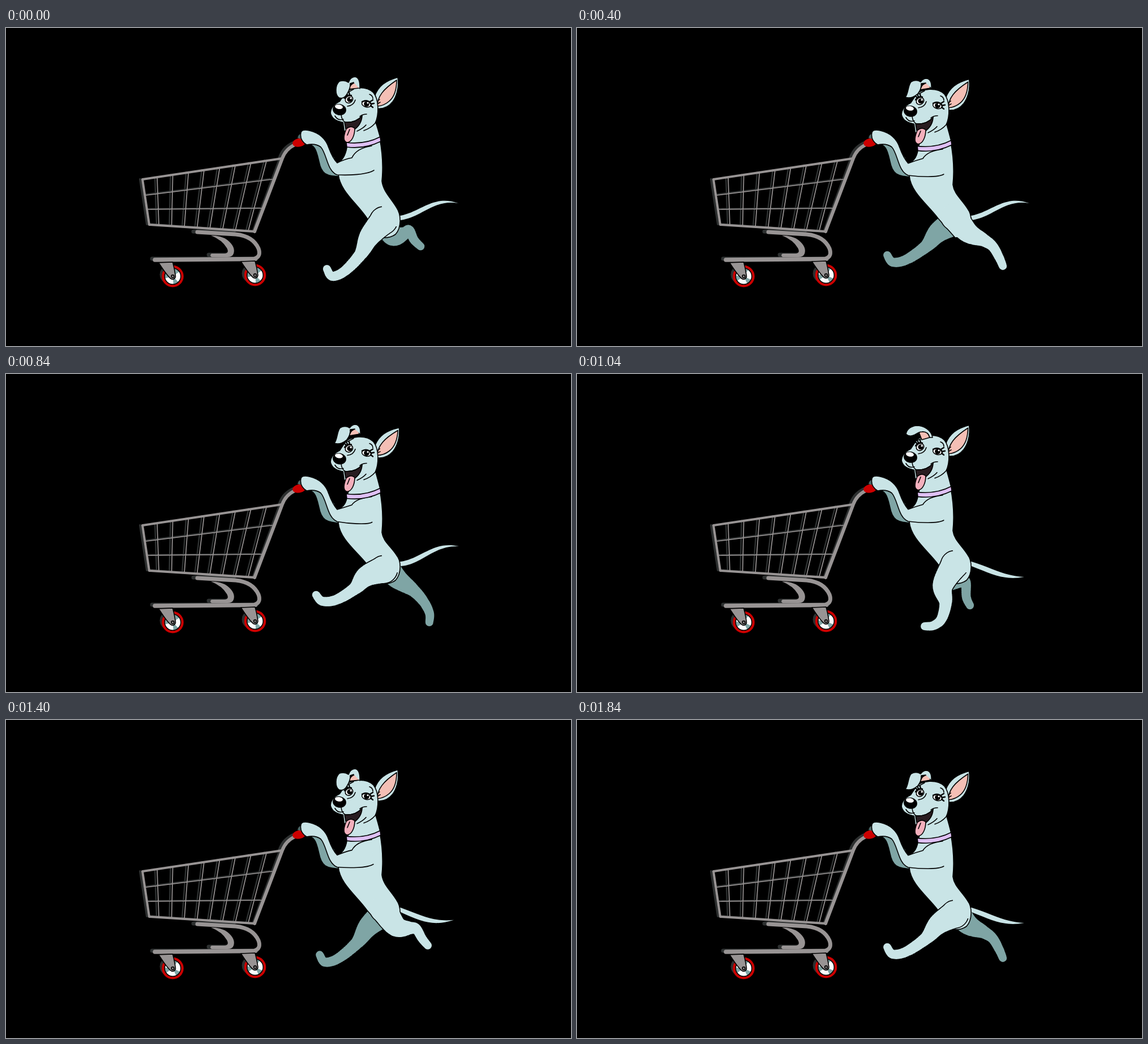
Animation of 998 by 561 pixels, one loop 1880 ms. Source, as an HTML page:

```html
<!DOCTYPE html>
<html lang="en">
<head>
<meta charset="utf-8">
<title>Dog with a shopping cart</title>
<style>
html, body { margin: 0; width: 100%; height: 100%; overflow: hidden; background: #000; }
svg { display: block; width: 100%; height: 100%; }
path, circle, ellipse { stroke-linejoin: round; stroke-linecap: round; }
.skin { fill: #c9e4e6; }
.far { fill: #7fa5a5; }
.pink { fill: #f4bfb5; }
.ink { stroke: #000; stroke-width: 1.6; }
.line { fill: none; stroke: #000; stroke-width: 1.6; }
.rail { fill: none; stroke: #989494; }
.shade { fill: none; stroke: #2d3030; }
</style>
</head>
<body>
<svg viewBox="0 0 998 561">
  <clipPath id="thighEdge"><path d="M500 280H664V350H800V500H500Z"/></clipPath>
  <rect width="998" height="561"/>

  <g id="cart">
    <g class="shade" transform="translate(-4 -1)">
      <path stroke-width="4" d="M241 268L253 347L440 360L488 230"/>
      <path stroke-width="7" d="M488 230Q495 210 515 203M335 360H406M362 401H395M262 408H446"/>
      <path id="wireShade" stroke-width="2.5"/>
      <circle cx="292" cy="436" r="16" fill="#2d3030"/>
      <circle cx="437" cy="434" r="16" fill="#2d3030"/>
    </g>
    <path id="wires" class="rail" stroke-width="1.7"/>
    <path class="rail" stroke-width="4" d="M488 230L241 267L253 347L440 359"/>
    <path class="rail" stroke-width="6" d="M439 359L488 230Q495 211 515 204"/>
    <path fill="#989494" d="M362 366Q380 366 391 374Q406 386 402 398Q400 404 391 404H363Q359 401 363 398H386Q395 397 390 388Q382 374 362 366Z"/>
    <path class="rail" stroke-width="7" d="M338 360L406 364Q436 367 446 389Q451 403 439 407"/>
    <path class="rail" stroke-width="7.5" d="M263 409L440 407.5"/>
    <g id="wheels"></g>
    <ellipse cx="518" cy="202" rx="12" ry="7.5" transform="rotate(-12 518 202)" fill="#cc0000"/>
    <path d="M515 194Q517 185 523 188L522 196Z" fill="#4d6464"/>
  </g>

  <path id="tail" class="skin"/>
  <path id="farLeg" class="far"/>
  <path id="farArm" class="far ink"/>
  <path id="legUnder" stroke="#000" stroke-width="3"/>
  <path id="body" class="skin ink"/>
  <path id="legOver" stroke="#000" stroke-width="3" clip-path="url(#thighEdge)"/>
  <path id="leg" class="skin"/>
  <path id="armFill" class="skin"/>
  <path id="armLine" class="line"/>

  <path id="neck" class="skin"/>
  <path id="collar" class="ink" fill="#dfc0f5" d="M601 202Q634 206 661 192L662 200Q634 214 602 210Z"/>
  <g id="head">
    <g id="rightEar">
      <path class="skin ink" d="M651 121C657 103 670 93 692 87C695 106 689 122 683 130Q672 144 655 142Z"/>
      <path class="pink ink" d="M656 138C656 121 666 108 690 92C690 112 684 123 677 129Q668 137 656 138Z"/>
      <path class="line" d="M655 130L660 126M656 134L661 131"/>
    </g>
    <path class="skin" d="M600 115C607 104 636 101 649 114C659 126 659 154 652 168Q640 182 618 185L598 181L596 166C588 164 577 162 574 150Q574 138 590 130Z"/>
    <path class="line" d="M600 115C607 104 636 101 649 114C659 126 659 154 652 168Q644 177 632 181"/>
    <path d="M598 166Q617 168 629 155Q628 171 614 180L600 178Z" fill="#281c20" class="ink"/>
    <path d="M601 178Q609 171 616 177C616 189 611 202 602 202C594 199 597 188 601 178Z" fill="#f3afbc" class="ink"/>
    <path class="line" d="M607 179L603 189M592 153Q593 163 599 166Q617 168 629 155M625 156Q630 152 637 152M636 171Q631 177 620 182M581 155Q586 164 596 161M617 127Q614 137 603 138M642 117Q648 119 648 125M603 114L614 108"/>
    <ellipse cx="589" cy="144" rx="12" ry="10" transform="rotate(12 589 144)"/>
    <ellipse cx="588" cy="139" rx="7" ry="4" transform="rotate(8 588 139)" fill="#fff"/>
    <g class="ink">
      <ellipse cx="606" cy="126" rx="7" ry="6" transform="rotate(-35 606 126)" fill="#fff"/>
      <ellipse cx="637" cy="134" rx="8.5" ry="5.5" transform="rotate(12 637 134)" fill="#fff"/>
      <path d="M598 124Q602 117 610 119M600 119L596 116M603 118L600 113M607 118L606 114M629 130Q640 125 645 135M643 130L648 127M645 134L650 133M644 137L648 140" fill="none" stroke-width="2.4"/>
    </g>
    <circle cx="607" cy="126" r="4.6"/><circle cx="637" cy="134" r="4.8"/>
    <circle cx="609" cy="124" r="1.6" fill="#fff"/><circle cx="639" cy="132" r="1.6" fill="#fff"/>
  </g>
  <path id="earInner" class="pink ink"/>
  <path id="ear" class="skin ink"/>
</svg>

<script>
const STEP = 40, FRAMES = 47, STRIDE = 24, BOUNCE = 12, WAG = 10, TURN = 2 * Math.PI;
const $ = id => document.getElementById(id);
const draw = (id, d) => $(id).setAttribute("d", d);
const move = (id, value) => $(id).setAttribute("transform", value);
const mix = (a, b, k) => a + (b - a) * k;
const clamp = v => Math.min(1, Math.max(0, v));

const spline = (a, b, c, d, k) =>
  b + k / 2 * (c - a + k * (2 * a - 5 * b + 4 * c - d + k * (3 * (b - c) + d - a)));

// Returns a smooth closed path through evenly timed "x,y" points; t runs from 0 to 1.
function trace(text) {
  const points = text.split(" ").map(p => p.split(",").map(Number));
  const n = points.length;
  return t => {
    const i = Math.floor(t * n), k = t * n - i;
    return [0, 1].map(axis => spline(...[-1, 0, 1, 2].map(o => points[(i + o + n) % n][axis]), k));
  };
}

// One stride of the leg, starting as the foot lands in front.
const kneePath = trace("642,368 650,374 672,374 690,360 683,366 636,362 622,357 636,357");
const anklePath = trace("598,429 666,431 698,430 738,402 712,357 672,374 627,383 584,398");
const heelPath = trace("576,438 656,444 695,443 748,422 721,374 668,402 600,381 559,401");

function joints(t) {
  const knee = kneePath(t), ankle = anklePath(t), heel = heelPath(t);
  const hip = [667, 333 + 0.85 * Math.max(0, 650 - knee[0])];
  const shin = [(knee[0] + ankle[0]) / 2 + 6, (knee[1] + ankle[1]) / 2 + 1];
  // The toe swings freely in the air and lies flat on the ground.
  const swing = 68 + 95 * Math.cos(TURN * t) - 18 * Math.cos(2 * TURN * t);
  const angle = mix(swing, 85, clamp((heel[1] - 438) / 4)) * Math.PI / 180;
  const toe = [heel[0] - 16 * Math.sin(angle), heel[1] + 16 * Math.cos(angle)];
  return [hip, knee, shin, ankle, heel, toe];
}

const disc = (x, y, r) => {
  const f = v => v.toFixed(2);
  return `M${f(x - r)} ${f(y)}a${f(r)} ${f(r)} 0 1 1 ${f(2 * r)} 0a${f(r)} ${f(r)} 0 1 1 ${f(-2 * r)} 0`;
};

// A limb is a dense chain of discs along a smooth centre line.
function limb(phase) {
  const girth = [24, 18, 11, 9, 8, 7];
  const bones = joints(phase % STRIDE / STRIDE), last = bones.length - 1;
  const joint = i => bones[Math.min(last, Math.max(0, i))];
  let d = "";
  for (let i = 0; i < last; i++) {
    for (let s = 0; s <= 10; s++) {
      const k = s / 10;
      const [x, y] = [0, 1].map(n => spline(joint(i - 1)[n], joint(i)[n], joint(i + 1)[n], joint(i + 2)[n], k));
      d += disc(x, y, mix(girth[i], girth[i + 1], k));
    }
  }
  return d;
}

const ears = {
  folded: ["M625 107Q626 87 616 86Q608 87 605 96Q598 91 589 94C581 101 581 118 588 123Q597 126 602 117Q609 106 608 98L614 96",
    "M605 108Q609 97 619 96Q624 99 624 106Z"],
  hanging: ["M626 106Q627 91 618 89Q611 89 607 95Q599 90 590 95C584 103 586 114 580 122Q590 126 602 116Q609 107 608 98L616 97",
    "M606 109Q610 97 619 97Q624 100 624 106Z"],
  arched: ["M628 112C626 99 613 91 599 91Q583 94 581 106Q588 112 597 107Q604 102 609 102Q620 101 623 112Z",
    "M604 103Q614 99 620 104L623 112L609 116Z"],
  raised: ["M632 115Q631 106 624 105Q618 109 611 107C604 102 599 99 589 100Q582 104 585 112Q591 122 603 119Q612 115 622 117Z", ""]
};
const earAt = beat => beat < 1 || beat > 10 ? ears.folded : beat < 5 ? ears.arched : beat < 8 ? ears.raised : ears.hanging;

function buildCart() {
  let d = "M247 295L470 267M250 320L452 318";
  for (let i = 0; i < 8; i++) {
    const top = 267 + 27.6 * i, low = 270 + 22.5 * i;
    d += `M${top} ${268 - (top - 241) * 0.154}L${low} ${347 + (low - 253) * 0.07}`;
  }
  draw("wires", d);
  draw("wireShade", d);
  const wedge = "M0 0L13.2 -4.8A14 14 0 0 1 13.2 4.8Z";
  const wheel = (x, y) => `<g transform="translate(${x} ${y})">
    <circle r="17" fill="#fff" stroke="#cc0000" stroke-width="4.5"/>
    <g class="spokes">${[0, 120, 240].map(a => `<path class="far" transform="rotate(${a})" d="${wedge}"/>`).join("")}</g>
    <circle r="14.3" class="line"/>
    <path class="ink" fill="#989494" d="M-25 -24L0 -25Q3 -14 5 0Q4 6 -2 5Q-8 2 -25 -24Z"/>
    <circle r="2.4" fill="#989494" class="ink"/></g>`;
  $("wheels").innerHTML = wheel(294.5, 438) + wheel(440, 436);
}

// The hips stay in place while the chest sinks by u.
function drawBody(u) {
  draw("body", `M603 ${203 + u}L660 ${194 + u}C666 ${225 + u} 666 ${250 + u} 664 ${270 + u}
    C666 ${288 + u * 0.8} 680 ${300 + u * 0.4} 690 ${317 + u * 0.3}C698 329 699 352 688 364Q680 370 668 370L638 336
    C620 ${309 + u * 0.4} 590 ${288 + u * 0.4} 587 ${258 + u * 0.5}L586 238Q601 ${230 + u * 0.5} 603 ${203 + u}Z`);
  draw("farArm", `M528 204C547 203 549 220 553 236C557 258 567 262 592 ${262 + u * 0.15}L580 228L550 198Z`);

  const upper = `M531 206Q518 198 521 184Q523 178 536 181C553 185 565 196 570 211Q577 230 585 ${238 + u * 0.1}Q599 ${231 + u * 0.4} 611 ${229 + u * 0.2}`;
  const shoulder = `Q619 ${212 + u * 0.75} 646 ${208 + u * 0.9}`;
  const end = `${650 - u * 0.35} ${251 + u * 1.1}`;
  const lower = `C638 ${259 + u * 0.8} 605 ${260 + u * 0.4} 585 ${259 + u * 0.15}C567 253 567 222 556 210Q547 203 531 206`;
  draw("armFill", `${upper}${shoulder}L${end}${lower}Z`);
  draw("armLine", `${upper}${shoulder}M${end}${lower}`);
}

// The wave runs along the tail, so its tip lags behind its root.
function drawTail(n) {
  const sway = lag => Math.cos(TURN * (n - lag) / WAG);
  const root = 334 - 11 * sway(0), bend = 325 - 33 * sway(0.5), tip = 331 - 27 * sway(1);
  const end = 795 + 5 * sway(1);
  draw("tail", `M692 331H697C735 ${root} 755 ${bend} ${end} ${tip}C755 ${bend + 8} 735 ${root + 11} 697 339H692Z`);
}

function render(ms) {
  const n = Math.floor(ms / STEP) % FRAMES;
  const beat = n % BOUNCE, stride = n % STRIDE;
  const sink = 19 * (1 - Math.abs(beat / 6 - 1));
  const dip = Math.sin(Math.PI * beat / BOUNCE) ** 2;
  const nod = 11 * dip;

  drawBody(sink);
  drawTail(n);
  move("collar", `translate(0 ${sink})`);
  move("head", `translate(0 ${nod})`);
  move("rightEar", `rotate(${13 * dip * dip} 655 132)`);
  draw("neck", `M613 ${176 + nod}L650 ${160 + nod}Q657 ${180 + sink} 661 ${197 + sink}L603 ${207 + sink}Z`);
  const [ear, inner] = earAt(beat);
  draw("ear", ear);
  draw("earInner", inner);

  const near = limb(stride), trailing = stride > 7 && stride < 15;
  draw("leg", near);
  draw("legUnder", trailing ? near : "");
  draw("legOver", trailing ? "" : near);
  draw("farLeg", limb(stride + STRIDE / 2));

  const spin = n % 4 < 2 ? 65 : 45;
  document.querySelectorAll(".spokes").forEach(s => s.setAttribute("transform", `rotate(${spin})`));
}

buildCart();
const start = performance.now();
function tick() {
  render(performance.now() - start);
  requestAnimationFrame(tick);
}
tick();
</script>
</body>
</html>
```
